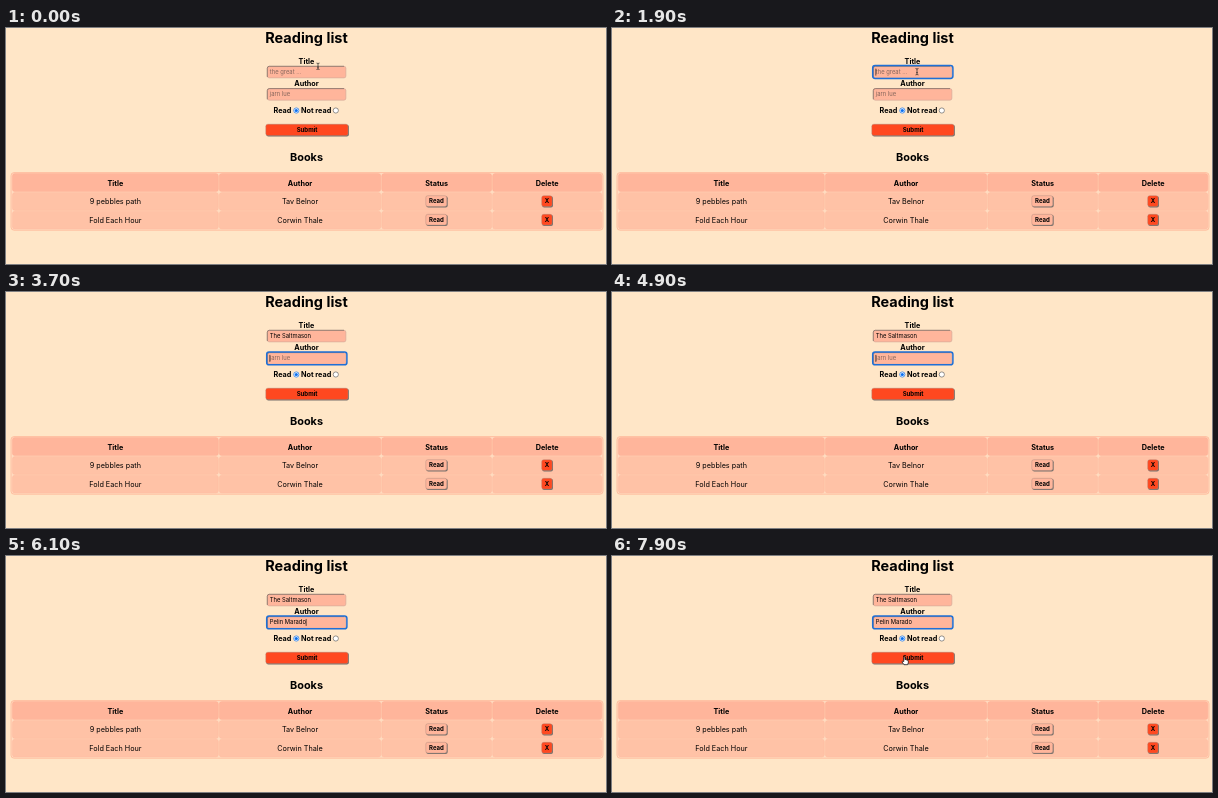
Recreate the animation shown at these times as an HTML page. Size 600x236 px, loop 8 s.

```html
<!DOCTYPE html>
<html lang="en">
<head>
<meta charset="utf-8">
<title>Reading list</title>
<style>
  html, body { margin: 0; width: 100%; height: 100%; overflow: hidden; background: #ffe6c7; }
  svg { display: block; width: 600px; height: 236px; font: 7.25px Inter, sans-serif; }
  .bold { font-weight: 700; }
  .mid { text-anchor: middle; }
  .small { font-size: 6.04px; }
  .field { font-size: 5.85px; }
  .menu { font-size: 5.15px; fill: #eee; }
</style>
</head>
<body>
<svg id="stage" viewBox="0 0 600 236">
  <g id="page"></g>
  <g id="fields"></g>
  <g id="pointer"></g>
</svg>
<script>
const LOOP = 8000;
const PINK = '#ffb59b', RED = '#ff4820';
const BOOK = 'The Saltmason', WRITER = 'Pelin Marado';
const byId = id => document.getElementById(id);

const text = (x, y, s, cls = '', fill = '#000') =>
  `<text x="${x}" y="${y}" class="${cls}" fill="${fill}">${s}</text>`;
const box = (x, y, w, h, r, fill, stroke = 'none', lineWidth = 0.9) =>
  `<rect x="${x}" y="${y}" width="${w}" height="${h}" rx="${r}" fill="${fill}" stroke="${stroke}" stroke-width="${lineWidth}"/>`;

// Button with a dark lower right edge.
const button = (x, y, w, h, fill, label) =>
  box(x + 0.5, y + 0.5, w, h, 2, '#77706c') + box(x, y, w - 0.4, h - 0.4, 2, fill, '#a98a7d', 0.4) +
  text(x + w / 2, y + h / 2 + 2.1, label, 'bold small mid');

const radio = (x, on) =>
  `<circle cx="${x}" cy="82.5" r="2.6" fill="#fff" stroke="${on ? '#0b70f0' : '#666'}" stroke-width=".7"/>` +
  (on ? `<circle cx="${x}" cy="82.5" r="1.6" fill="#0b70f0"/>` : '');

function drawPage() {
  const columns = [[6.4, 206, 'Title'], [213.3, 161.5, 'Author'], [375.7, 110, 'Status'], [486.6, 109.2, 'Delete']];
  const books = [['9 pebbles path', 'Tav Belnor'], ['Fold Each Hour', 'Corwin Thale']];
  let out = text(300.5, 15, 'Reading list', 'bold mid').replace('<text', '<text style="font-size:14.5px"') +
    text(300.5, 35.6, 'Title', 'bold mid') + text(300.5, 57.9, 'Author', 'bold mid') +
    text(267.5, 84.9, 'Read', 'bold') + radio(290.3, true) +
    text(295, 84.9, 'Not read', 'bold') + radio(329.8, false) +
    button(259.8, 96.2, 82.6, 11.8, RED, 'Submit') +
    text(300.5, 132.8, 'Books', 'bold mid').replace('<text', '<text style="font-size:10.9px"') +
    box(5, 144.6, 592, 57.6, 3, '#ffdcc0', '#ffa98a', 0.6);
  columns.forEach(([x, w, label], col) => {
    const center = x + w / 2;
    out += box(x, 145.6, w, 18, 2.5, PINK, '#ffad90', 0.4) + text(center, 157.5, label, 'bold mid');
    books.forEach((book, row) => {
      const y = 164.6 + row * 18.6;
      out += box(x, y, w, 17.8, 2.5, '#ffc2a6', '#ffb99d', 0.4);
      if (col < 2) out += text(center, y + 11.5, book[col], 'mid');
      else if (col === 2) out += button(419.8, y + 3.1, 21.4, 11.2, PINK, 'Read');
      else out += button(535.7, y + 3.1, 10.8, 11.2, RED, 'X');
    });
  });
  byId('page').innerHTML = out;
}

// Each step: start, focused field, title, author, menu open, menu row chosen
const steps = [
  [0, -1, '', ''],
  [600, 0, '', ''],
  [2000, 0, 't', '', true],
  [2400, 0, 'th', '', true],
  [3000, 0, BOOK, '', true, true],
  [3250, 0, BOOK, ''],
  [3680, 1, BOOK, ''],
  [5300, 1, BOOK, 'P', true],
  [5850, 1, BOOK, WRITER, true, true],
  [6080, 1, BOOK, WRITER]
];
const placeholders = ['the great ...', 'jarn lue'];
const menus = [[BOOK, 'intro-component-with-signu…'], [WRITER, 'pavil']];
const fieldTop = [38, 60.3];

const ruler = document.createElement('canvas').getContext('2d');
function textWidth(s) {
  ruler.font = '58.5px Inter, sans-serif';
  return ruler.measureText(s).width / 10;
}

function drawField(i, value, focused, caret) {
  const y = fieldTop[i];
  let out = box(261.3, y + 0.3, 78.6, 11.6, 2, PINK, '#cfa799', 0.6) +
    `<path d="M261.3 ${y + 11}V${y + 2.3}q0-2 2-2H338" fill="none" stroke="#77655f" stroke-width=".7"/>`;
  if (focused) out += box(260.7, y - 0.4, 80.2, 12.9, 2.4, 'none', '#1f6fd6', 1.5);
  out += text(263.8, y + 8.1, value || placeholders[i], 'field', value ? '#000' : '#86665c');
  if (caret) out += box(263.6 + textWidth(value), y + 2.6, 0.6, 7, 0, '#000');
  return out;
}

function drawMenu(i, chosen) {
  const y = fieldTop[i] + 12;
  return box(259.4, y + 0.6, 82.4, 19.4, 1, 'rgba(0,0,0,.15)') + box(260.2, y, 80.8, 18.8, 0.6, '#1b1a1a') +
    (chosen ? box(260.2, y + 0.8, 80.8, 8.6, 0, '#414141') : '') +
    menus[i].map((s, row) => text(262.8, y + 6.9 + row * 8.7, s, 'menu', '#eee')).join('');
}

function drawFields(t) {
  const [start, focus, title, author, open, chosen] = steps.filter(s => s[0] <= t).pop();
  const caretOn = Math.floor((t - start) / 500) % 2 === 0;
  byId('fields').innerHTML =
    [title, author].map((value, i) => drawField(i, value, focus === i, focus === i && caretOn)).join('') +
    (open ? drawMenu(focus, chosen) : '');
}

const shapes = {
  beam: '<path d="M-1.5-3.2Q0-3.2 0-2.4Q0-3.2 1.5-3.2M0-2.6V2.6M-1.5 3.2Q0 3.2 0 2.4Q0 3.2 1.5 3.2M-.8.9H.8" fill="none" stroke="#222" stroke-width=".7"/>',
  arrow: '<path d="M0 0V7L1.6 5.6 2.7 8 3.8 7.5 2.8 5.2H5Z" fill="#000" stroke="#fff" stroke-width=".5"/>',
  hand: '<path d="M-1 3V-1.2Q-.4-2 .2-1.2V1.2Q1 .7 1.4 1.4 2.2 1 2.6 1.8 3.5 1.6 3.5 2.5V4.2L2.8 6.2H-.8L-2.8 3.4Q-2.6 2.2-1 3Z" fill="#fff" stroke="#000" stroke-width=".7"/>'
};

function drawPointer(t) {
  const ease = (a, b) => {
    const p = Math.min(1, Math.max(0, (t - a) / (b - a)));
    return p * p * (3 - 2 * p);
  };
  const toField = ease(50, 600), toSubmit = ease(6920, 7720);
  const x = 312 - 7 * toField - 12.2 * toSubmit;
  const y = 38.3 + 5.4 * toField + 58.8 * toSubmit;
  const overField = fieldTop.some(top => y >= top - 0.5 && y <= top + 12.5);
  const overLabel = y < 60;
  const shape = y > 96 ? 'hand' : overField || overLabel ? 'beam' : 'arrow';
  const hidden = t >= 2000 && t < 6850;
  byId('pointer').innerHTML = hidden ? '' : `<g transform="translate(${x} ${y})">${shapes[shape]}</g>`;
}

function draw() {
  const t = performance.now() % LOOP;
  drawFields(t);
  drawPointer(t);
  requestAnimationFrame(draw);
}

drawPage();
draw();
</script>
</body>
</html>
```
